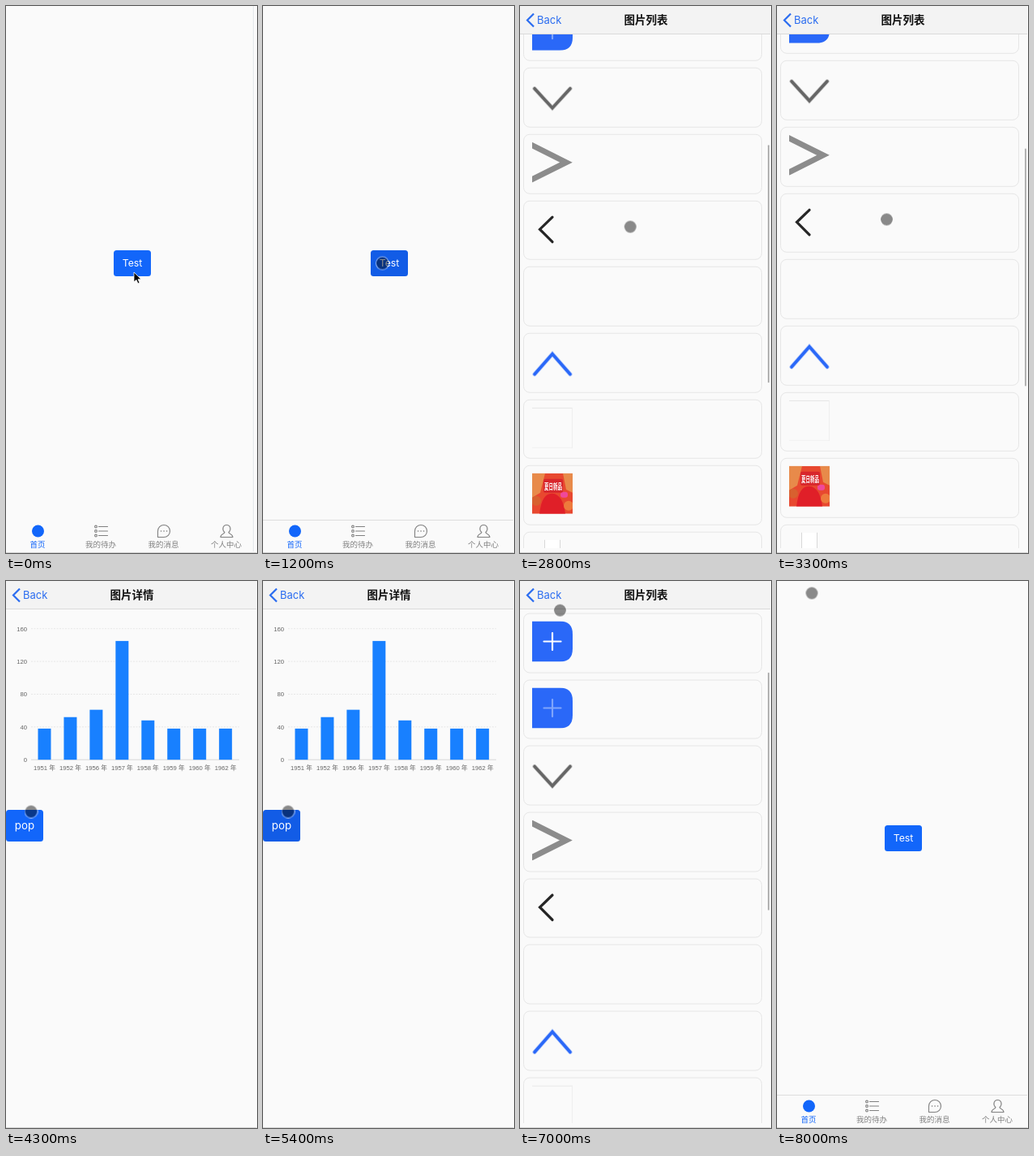
Animation of 310 by 674 pixels, one loop 8.6 s. Source, as an HTML page:

```html
<!DOCTYPE html>
<html lang="zh-CN">
<head>
<meta charset="utf-8">
<title>图片列表</title>
<style>
@property --push { syntax: '<number>'; inherits: true; initial-value: 0; }
@property --detail { syntax: '<number>'; inherits: true; initial-value: 0; }
@property --scroll { syntax: '<number>'; inherits: true; initial-value: 0; }

html, body { margin: 0; width: 100%; height: 100%; overflow: hidden; background: #fafafa; }
.stage {
  --blue: #1266fa;
  position: relative; width: 310px; height: 674px; overflow: hidden; background: #fafafa;
  font-family: Inter, "Noto Sans CJK SC", "Noto Sans CJK", sans-serif;
  animation: push 8.6s infinite, detail 8.6s infinite, scroll 8.6s infinite;
}
.stage::after {
  content: ""; position: absolute; inset: 0;
  border-bottom: 1px solid #d6d6d6; border-right: 1px solid #fff; box-sizing: border-box;
}
.page, svg { position: absolute; left: 0; top: 0; width: 310px; height: 674px; }
.page { background: #fafafa; overflow: hidden; }
.home { transform: translateX(calc(var(--push) * -30%)); }
.nav { transform: translateX(calc((1 - var(--push)) * 100%)); }
.list { transform: translateX(calc(var(--detail) * -30%)); }
.detail { transform: translateX(calc((1 - var(--detail)) * 100%)); }

.btn {
  position: absolute; display: flex; align-items: center; justify-content: center;
  background: var(--blue); color: #fff; border-radius: 3.5px;
}
.test { left: 133px; top: 300.5px; width: 46px; height: 32px; font-size: 12.3px; animation: test 8.6s infinite; }
.pop { left: 0; top: 281.5px; width: 46px; height: 39.5px; font-size: 13.3px; animation: pop 8.6s infinite; }

.tabline { position: absolute; top: 633px; width: 309px; height: 1px; background: #dedede; animation: settle 8.6s infinite; }
.edge { position: absolute; left: 305px; top: 0; width: 1px; height: 672px; background: #e4e8ea; animation: arrow 8.6s infinite; }
.tab { position: absolute; top: 657px; width: 78px; text-align: center; font-size: 9.5px; line-height: 14px; color: #808080; }
.tab.on { color: var(--blue); font-weight: 500; }

.head { position: absolute; left: 0; top: 0; width: 310px; height: 34px; background: #f3f3f3; border-bottom: 1px solid #dadada; overflow: hidden; }
.back { position: absolute; left: 21px; top: 0; font-size: 13px; line-height: 35px; color: #2a6cf0; }
.title { position: absolute; left: 0; top: 0; width: 311px; text-align: center; font-size: 13.5px; font-weight: 700; line-height: 34px; color: #111; }
.t1 { transform: translateX(calc(var(--detail) * -100px)); opacity: calc(1 - var(--detail)); }
.t2 { transform: translateX(calc((1 - var(--detail)) * 140px)); opacity: var(--detail); }

.clip { position: absolute; left: 0; top: 35px; width: 310px; height: 633px; overflow: hidden; }
.rows { position: absolute; left: 4px; top: 5.6px; transform: translateY(calc(var(--scroll) * -1px)); }
.row { box-sizing: border-box; width: 295px; height: 73.7px; margin-bottom: 8px; border: 1px solid #e6e6e6; border-radius: 8px; position: relative; }
.row svg { left: 9.5px; top: 9px; width: 50px; height: 50px; overflow: hidden; }
.thumb {
  position: absolute; left: 305.5px; top: 37px; width: 2.5px; height: 293px; border-radius: 2px; background: #b2b2b2;
  transform: translateY(calc(var(--scroll) * .461px));
}
.chart { font: 7.7px "Liberation Sans", "Noto Sans CJK SC", sans-serif; fill: #666; }

.dot {
  position: absolute; left: -9px; top: -9px; width: 15px; height: 15px; border-radius: 50%;
  border: 1.5px solid rgba(255, 255, 255, .5); background: rgba(0, 0, 0, .45); background-clip: padding-box;
  animation: dot 8.6s infinite;
}
.arrow { animation: arrow 8.6s infinite; }

@keyframes push {
  0%, 15.116% { --push: 0; animation-timing-function: cubic-bezier(.2, .8, .3, 1); }
  20.349%, 86.047% { --push: 1; animation-timing-function: cubic-bezier(.2, .8, .3, 1); }
  91.279%, 100% { --push: 0; }
}
@keyframes detail {
  0%, 40.698% { --detail: 0; animation-timing-function: cubic-bezier(.2, .8, .3, 1); }
  45.93%, 63.953% { --detail: 1; animation-timing-function: cubic-bezier(.2, .8, .3, 1); }
  69.186%, 100% { --detail: 0; }
}
@keyframes scroll {
  0%, 22.093% { --scroll: 0; animation-timing-function: linear; }
  25.581% { --scroll: 163.4; animation-timing-function: cubic-bezier(.2, .75, .45, 1); }
  37.209%, 74.419% { --scroll: 300.2; animation-timing-function: linear; }
  77.907% { --scroll: 215; animation-timing-function: cubic-bezier(.2, .75, .45, 1); }
  82.558%, 100% { --scroll: 163.4; }
}
@keyframes test {
  0%, 12.79% { background: #1266fa; animation-timing-function: step-end; }
  12.791%, 16% { background: #125ce6; }
  18%, 100% { background: #1266fa; }
}
@keyframes pop {
  0%, 62.2% { background: #1266fa; }
  62.8%, 64.5% { background: #125ce6; }
  66%, 100% { background: #1266fa; }
}
@keyframes settle {
  0%, 1.16% { opacity: 0; }
  5%, 100% { opacity: 1; }
}
@keyframes arrow {
  0%, 3.48% { opacity: 1; }
  3.488%, 100% { opacity: 0; }
}
@keyframes dot {
  0%, 3.48% { opacity: 0; transform: translate(157px, 326px); }
  3.488% { opacity: 1; transform: translate(157px, 326px); }
  10.465%, 15.116% { opacity: 1; transform: translate(148px, 317.5px); }
  22.093% { transform: translate(147px, 428px); animation-timing-function: linear; }
  25.581% { transform: translate(142.5px, 342.5px); }
  37.209%, 40.698% { transform: translate(136px, 263.5px); }
  47.674%, 63.953% { transform: translate(31.5px, 284.5px); }
  69.767%, 74.419% { transform: translate(128px, 218.5px); animation-timing-function: linear; }
  77.907% { transform: translate(130px, 300px); }
  83.14%, 100% { opacity: 1; transform: translate(43.5px, 15.5px); }
}
</style>
</head>
<body>
<div class="stage">
  <div class="page home">
    <div class="edge"></div>
    <div class="btn test">Test</div>
    <div class="tabline"></div>
    <svg viewBox="0 0 310 674" fill="none" stroke="#808080" stroke-width="1.1" stroke-linecap="round" stroke-linejoin="round">
      <circle cx="39.5" cy="647" r="7.5" fill="#1266fa" stroke="none"/>
      <path d="M114.5 641.5H125.500M114.500 647H125.500M114.500 652.500H125.500"/>
      <g><circle cx="111" cy="641.5" r="1.4"/><circle cx="111" cy="647" r="1.400"/><circle cx="111" cy="652.5" r="1.4"/></g>
      <path d="M187.500 654.500V647A7.500 7.500 0 1 1 195 654.500Z"/>
      <path d="M191.500 647H191.600M195 647H195.100M198.500 647H198.600" stroke-width="1.600"/>
      <path d="M270 648.500C266.500 645.500 267.500 639.500 272.500 639.500S278.500 645.500 275 648.500C275 650.500 280 650.500 280 654.500H265C265 650.500 270 650.500 270 648.500Z"/>
    </svg>
    <div class="tab on" style="left:0">首页</div>
    <div class="tab" style="left:78px">我的待办</div>
    <div class="tab" style="left:155.500px">我的消息</div>
    <div class="tab" style="left:233px">个人中心</div>
  </div>

  <div class="page nav">
    <div class="page list">
      <div class="clip"><div class="rows"></div></div>
      <div class="thumb"></div>
    </div>
    <div class="page detail">
      <svg class="chart" viewBox="0 0 310 674"></svg>
      <div class="btn pop">pop</div>
    </div>
    <div class="head">
      <svg viewBox="0 0 310 674"><path d="M17 9.500L9 17.500L17 25.500" fill="none" stroke="#2a6cf0" stroke-width="2.200"/></svg>
      <div class="back">Back</div>
      <div class="title t1">图片列表</div>
      <div class="title t2">图片详情</div>
    </div>
  </div>

  <div class="dot"></div>
  <svg class="arrow" viewBox="0 0 310 674">
    <path d="M158 328V340L161 337.500L163 342L165 341L163 336.800H167Z" fill="#000" stroke="#fff" stroke-width=".8"/>
  </svg>
</div>

<script>
const $ = s => document.querySelector(s);

const line = (d, color, width, cap = 'round') =>
  `<path d="${d}" fill="none" stroke="${color}" stroke-width="${width}" stroke-linecap="${cap}"/>`;
const soft = (d, color, width) =>
  `<g opacity=".35">${line(d, color, width + 1.6)}</g>` + line(d, color, width);
const plus = alpha =>
  '<path d="M0 0H34Q50 0 50 16V34Q50 50 34 50H0Z" fill="#2a68f8"/>' +
  `<g opacity="${alpha}">${line('M14.5 25H35.5M25 14.5V35.5', '#fff', 2.2)}</g>`;

const promo = `
  <rect width="50" height="50" fill="#e8482f"/>
  <path d="M0 0H16L10 24L0 30ZM50 0H38L42 20L50 24Z" fill="#e88a4a"/>
  <path d="M9 50Q12 24 25 25Q38 26 41 50Z" fill="#e01f28"/>
  <circle cx="5" cy="34" r="6" fill="#d8602f"/>
  <circle cx="45" cy="40" r="6" fill="#ee7a3c"/>
  <rect x="35" y="23" width="9" height="7" rx="3" fill="#f0489a"/>
  <rect x="14" y="7" width="24" height="17" rx="2" fill="#d8262c"/>
  <text x="26" y="20" font-size="5.5" font-weight="700" fill="#fff" text-anchor="middle"
    transform="translate(0 -18) scale(1 1.9)">夏日新品</text>`;

const icons = [
  '', '',
  plus(1),
  plus(.4),
  soft('M3 16L25 40L47 16', '#666', 3.6),
  line('M-4 2L42 25L-4 48', '#8c8c8c', 7, 'butt'),
  line('M25 10.5L9.500 25.500L25 41', '#262626', 3.2),
  '',
  soft('M3 41L25 16L47 41', '#2a68f8', 3.6),
  line('M0 .5H50', '#e2e2e2', 1) + line('M49.500 0V50M0 49.500H50', '#efefef', 1),
  promo,
  '<rect x="15" width="19" height="50" fill="#fff"/>' + line('M15.500 0V50M34.500 0V50', '#d8d8d8', 1),
  '', '', '', '', ''
];
$('.rows').innerHTML = icons.map(i => `<div class="row"><svg viewBox="0 0 50 50">${i}</svg></div>`).join('');

const data = { 1951: 38, 1952: 52, 1956: 61, 1957: 145, 1958: 48, 1959: 38, 1960: 38, 1962: 38 };
const yOf = v => 220.2 - v * 1.009;
const grid = [0, 40, 80, 120, 160].map(v => `
  <path d="M31 ${yOf(v)}H288" stroke="${v ? '#e6e6e6' : '#d8d8d8'}" ${v ? 'stroke-dasharray="2 1.5"' : ''}/>
  <text x="26" y="${yOf(v) + 2.8}" text-anchor="end">${v}</text>`);
const bars = Object.entries(data).map(([year, v], i) => {
  const x = 47.5 + i * 31.95;
  return `<rect x="${x - 8}" y="${yOf(v)}" width="16" height="${v * 1.009}" fill="#1880ff"/>
    <text x="${x}" y="233" text-anchor="middle">${year} 年</text>`;
});
$('.chart').innerHTML = grid.concat(bars).join('');
</script>
</body>
</html>
```
